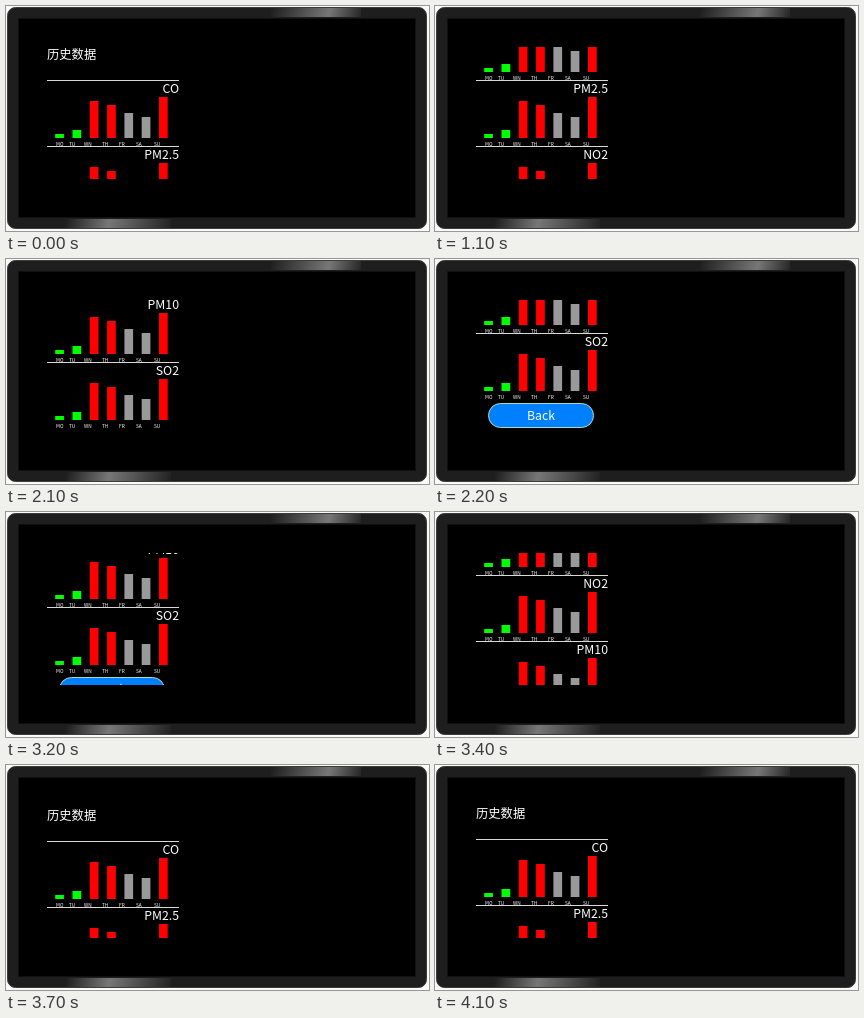
These frames come from a looping animation (423x225 px, 5.2 s). An HTML page with a canvas:

```html
<!DOCTYPE html>
<html lang="zh">
<head>
<meta charset="utf-8">
<style>
  html, body { margin: 0; width: 100%; height: 100%; overflow: hidden; background: #fafafa; }
  canvas { display: block; }
</style>
</head>
<body>
<canvas width="423" height="225"></canvas>
<script>
const ctx = document.querySelector('canvas').getContext('2d');
const LOOP = 5200, PITCH = 66;
const FONT = '"Noto Sans CJK SC", "Noto Sans CJK", "Noto Sans", sans-serif';
const charts = ['CO', 'PM2.5', 'NO2', 'PM10', 'SO2'];
const days = [['MO', 50, 4], ['TU', 63, 8], ['WN', 78, 37], ['TH', 96, 33],
              ['FR', 113, 25], ['SA', 130, 21], ['SU', 148, 41]];
const barColors = ['#0f0', '#0f0', '#f00', '#f00', '#999', '#999', '#f00'];

// The list jumps between scroll offsets: [start ms, offset]
const scrollSteps = [[0, 0], [1100, 66], [1200, 130], [1700, 196], [2100, 235], [2200, 264],
                     [3200, 243], [3300, 194], [3400, 143], [3500, 91], [3600, 39.5],
                     [3700, -2], [4100, 0]];
const scrollAt = t => scrollSteps.findLast(([start]) => start <= t)[1];

function rect(x, y, w, h, fill) {
  ctx.fillStyle = fill;
  ctx.fillRect(x, y, w, h);
}

function pill(x, y, w, h, r, fill, stroke) {
  ctx.beginPath();
  ctx.roundRect(x, y, w, h, r);
  ctx.fillStyle = fill;
  ctx.fill();
  ctx.strokeStyle = stroke;
  ctx.stroke();
}

function text(str, x, y, size = 12.3, align = 'left') {
  ctx.font = `${size}px ${FONT}`;
  ctx.textAlign = align;
  ctx.fillStyle = '#fff';
  ctx.fillText(str, x, y);
}

function shine(x0, x1, y, peak) {
  const g = ctx.createLinearGradient(x0, y, x1, y + 22);
  g.addColorStop(0, '#1e1e1e');
  g.addColorStop(peak, '#777');
  g.addColorStop(1, '#1e1e1e');
  rect(x0, y, x1 - x0, 9, g);
}

function drawBezel() {
  rect(0, 0, 423, 225, '#fafafa');
  pill(1.5, 1.5, 419, 221, 8, '#1e1e1e', '#3c3c3c');
  shine(265, 355, 2, 0.62);
  shine(60, 165, 213, 0.4);
  rect(12, 12, 398, 200, '#101010');
  rect(13, 13, 396, 198, '#000');
}

function drawChart(name, top) {
  rect(41, top, 132, 1, '#d8d8d8');
  text(name, 173, top + 13, 12.3, 'right');
  days.forEach(([day, x, height], i) => {
    rect(49.2 + 17.3 * i, top + 58 - height, 8.7, height, barColors[i]);
    text(day, x, top + 65.5, 4.8);
  });
}

function draw(now) {
  drawBezel();
  ctx.save();
  ctx.beginPath();
  ctx.rect(41, 41, 132, 132);
  ctx.clip();
  ctx.translate(0, -scrollAt(now % LOOP));
  text('历史数据', 41, 53);
  charts.forEach((name, i) => drawChart(name, 74 + PITCH * i));
  pill(53.5, 408.5, 105, 24, 12, '#0080ff', '#a8dcc0');
  text('Back', 106, 424.5, 12.3, 'center');
  ctx.restore();
  requestAnimationFrame(() => draw(performance.now()));
}

draw(0);
</script>
</body>
</html>
```
